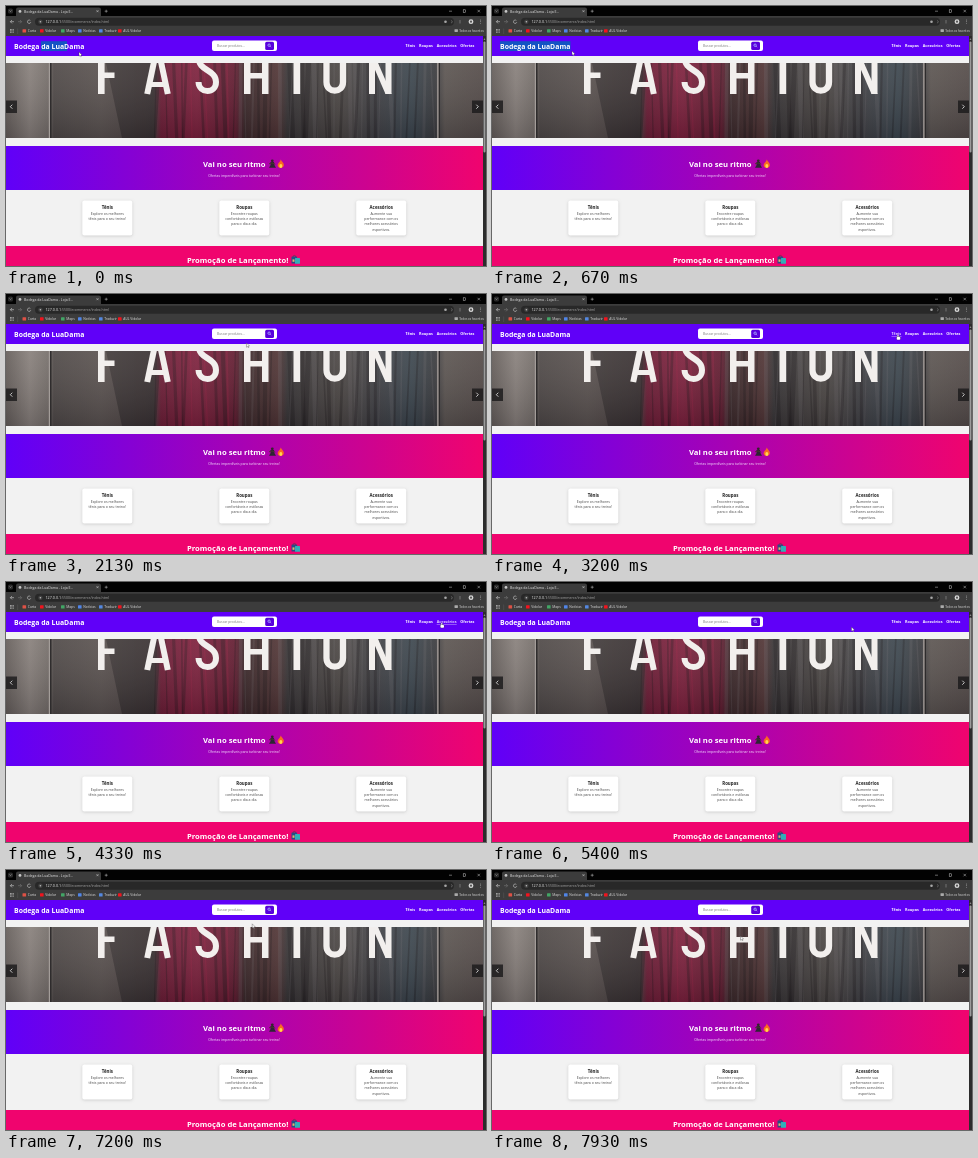
An HTML page with a canvas that plays this animation: 480 by 260 pixels, repeating every 8 s.

```html
<!DOCTYPE html>
<html lang="pt-BR">
<head>
<meta charset="utf-8">
<title>Bodega da LuaDama</title>
<style>
html, body { margin: 0; width: 100%; height: 100%; overflow: hidden; background: #000; }
canvas { display: block; width: 480px; height: 260px; }
</style>
</head>
<body>
<canvas id="stage" width="480" height="260"></canvas>
<script>
const LOOP = 8000, STEP = 1000 / 15;
const SANS = '"Open Sans", "Noto Sans", sans-serif';
const PURPLE = '#6000f8', PINK = '#f0046e';
const SHOP = 'Bodega da LuaDama';
const NAV = [['Tênis', 399.5, 10], ['Roupas', 413, 14], ['Acessórios', 430.7, 20], ['Ofertas', 454.3, 14]];

const stage = document.getElementById('stage').getContext('2d');
const page = document.createElement('canvas');
page.width = 480;
page.height = 260;
let g = page.getContext('2d');

function rect(x, y, w, h, fill) {
  g.fillStyle = fill;
  g.fillRect(x, y, w, h);
}

function round(x, y, w, h, r, fill) {
  g.fillStyle = fill;
  g.beginPath();
  g.roundRect(x, y, w, h, r);
  g.fill();
}

function dot(x, y, r, fill) {
  g.fillStyle = fill;
  g.beginPath();
  g.arc(x, y, r, 0, 7);
  g.fill();
}

function line(color, width, ...pts) {
  g.strokeStyle = color;
  g.lineWidth = width;
  g.beginPath();
  for (let i = 0; i < pts.length; i += 2) g.lineTo(pts[i], pts[i + 1]);
  g.stroke();
}

function shape(fill, ...pts) {
  g.fillStyle = fill;
  g.beginPath();
  for (let i = 0; i < pts.length; i += 2) g.lineTo(pts[i], pts[i + 1]);
  g.fill();
}

// Set large and scaled down, so small glyphs keep fractional spacing.
function text(str, x, y, size, color, weight = 400, align = 'left') {
  g.save();
  g.translate(x, y);
  g.scale(0.25, 0.25);
  g.font = `${weight} ${size * 4}px ${SANS}`;
  g.textAlign = align;
  g.fillStyle = color;
  g.fillText(str, 0, 0);
  g.restore();
}

function fade(x0, x1, stops) {
  const grad = g.createLinearGradient(x0, 0, x1, 0);
  stops.forEach(([at, color]) => grad.addColorStop(at, color));
  return grad;
}

function browser() {
  rect(0, 0, 480, 10, '#020202');
  round(10, 1.5, 85, 9, [2, 2, 0, 0], '#3c3c3c');
  dot(14, 5.4, 1.4, '#c8c8c8');
  text(SHOP + ' - Loja E…', 18, 6.7, 3.5, '#e6e6e6');
  line('#ddd', 0.5, 90.5, 4.2, 92.5, 6.2);
  line('#ddd', 0.5, 92.5, 4.2, 90.5, 6.2);
  line('#ccc', 0.5, 98.7, 5.2, 101.7, 5.2);
  line('#ccc', 0.5, 100.2, 3.7, 100.2, 6.7);
  round(2, 2.5, 5, 5, 1.5, '#2b2b2b');
  line('#ccc', 0.5, 3.5, 4.5, 4.5, 5.5, 5.5, 4.5);
  line('#ccc', 0.5, 443, 5.2, 446, 5.2);
  g.strokeRect(457.2, 3.8, 2.5, 2.5);
  line('#ccc', 0.5, 471.5, 3.8, 474, 6.3);
  line('#ccc', 0.5, 474, 3.8, 471.5, 6.3);

  rect(0, 10, 480, 20, '#3c3c3c');
  line('#d0d0d0', 0.6, 8, 15.7, 4.4, 15.7, 6, 14);
  line('#d0d0d0', 0.6, 4.4, 15.7, 6, 17.4);
  line('#777', 0.6, 12, 15.7, 15.6, 15.7, 14, 14);
  line('#777', 0.6, 15.6, 15.7, 14, 17.4);
  g.strokeStyle = '#d0d0d0';
  g.beginPath();
  g.arc(23.2, 15.7, 1.7, 0.3, 5.5);
  g.stroke();
  round(29, 11.8, 419, 8, 4, '#282828');
  dot(34.4, 15.8, 2.2, '#414141');
  dot(34.4, 15.8, 0.8, '#bbb');
  text('127.0.0.1', 39.5, 17.3, 3.7, '#f0f0f0');
  text(':5500/ecommerce/index.html', 55, 17.3, 3.5, '#a9a9a9');
  dot(439.5, 15.8, 1.3, '#a8a8a8');
  line('#999', 0.5, 445, 14.4, 446.5, 15.8, 445, 17.2);
  line('#aaa', 0.5, 454, 14, 454, 17.5);
  dot(465, 15.7, 2.4, '#d8d8d8');
  dot(465, 15.7, 1.1, '#555');
  for (let i = 0; i < 3; i++) dot(474.5, 14 + i * 1.6, 0.4, '#ddd');

  for (let i = 0; i < 9; i++) rect(4 + i % 3 * 1.4, 23 + (i / 3 | 0) * 1.4, 0.9, 0.9, '#bbb');
  line('#666', 0.4, 11.7, 22.5, 11.7, 28);
  const marks = [['Carta', 16.5, '#de5145'], ['Vidolar', 34, '#f0141e'], ['Maps', 55, '#42a565'],
    ['Notícias', 72, '#5085e8'], ['Traduzir', 93, '#5488e0'], ['AUL Vidolar', 112, '#f0141e']];
  marks.forEach(([name, x, color]) => {
    round(x, 23.2, 3.6, 3.4, 0.5, color);
    text(name, x + 5.3, 26.3, 3.3, '#dedede');
  });
  round(448.5, 23.2, 3.4, 2.8, 0.4, '#aaa');
  text('Todos os favoritos', 453.2, 26.3, 2.9, '#dedede');
}

function header() {
  rect(0, 30, 477, 20, PURPLE);
  round(206, 34.6, 65, 10.4, 2, '#fff');
  text('Buscar produtos...', 211, 41, 3.25, '#777');
  round(259.2, 35.7, 8.8, 8.4, 1.5, '#5800dc');
  g.strokeStyle = '#b3cfff';
  g.lineWidth = 0.7;
  g.beginPath();
  g.arc(263.1, 39.2, 1.2, 0, 7);
  g.stroke();
  line('#d5b7ff', 0.7, 264, 40.1, 265.1, 41.2);
}

function photo() {
  g.save();
  g.beginPath();
  g.rect(0, 57, 477, 75);
  g.clip();
  rect(0, 57, 477, 75, fade(0, 477, [
    [0, '#66605d'], [0.05, '#8b8480'], [0.09, '#77716d'], [0.1, '#4f4a49'], [0.2, '#5c5553'],
    [0.31, '#4c4243'], [0.325, '#701d38'], [0.4, '#81213f'], [0.48, '#641c32'], [0.5, '#3b292b'],
    [0.57, '#513536'], [0.59, '#383638'], [0.7, '#4d4947'], [0.78, '#414348'], [0.85, '#3c4851'],
    [0.9, '#3a3c40'], [0.92, '#5d5754'], [1, '#554d4b']]));

  let seed = 17;
  const rnd = () => (seed = seed * 16807 % 2147483647) / 2147483647;
  for (let x = 150; x < 425; x += 4 + rnd() * 6) {
    const w = 1 + rnd() * 4, lean = rnd() * 8 - 4;
    const red = x < 228;
    const tone = rnd() < 0.5 ? (red ? 'rgba(175,35,75,.27)' : 'rgba(125,120,125,.2)') : 'rgba(20,15,20,.3)';
    shape(tone, x, 57, x + w, 57, x + w + lean, 132, x + lean, 132);
  }
  shape('rgba(28,26,28,.4)', 100, 57, 155, 57, 150, 132, 116, 132);
  const shade = g.createLinearGradient(0, 57, 0, 132);
  shade.addColorStop(0, 'rgba(190,180,175,.12)');
  shade.addColorStop(1, 'rgba(15,10,14,.22)');
  rect(0, 57, 477, 75, shade);
  rect(42.8, 57, 1.3, 75, '#a39d99');
  rect(44.1, 57, 1.4, 75, '#292627');
  rect(431.3, 57, 1.4, 75, '#b2aaa5');
  rect(432.7, 57, 1.2, 75, '#2b292a');
  lettering();
  g.restore();

  for (const [x, dir] of [[0, -1], [466, 1]]) {
    rect(x, 94.5, 11, 12.5, 'rgba(28,26,28,.82)');
    const c = x + 5.3;
    line('#eee', 0.8, c - dir, 98.7, c + dir, 100.7, c - dir, 102.7);
  }
}

// Sign letters, cut off above the picture's top edge.
function lettering() {
  const ink = '#f2efed';
  g.lineJoin = 'miter';
  rect(92, 50, 6.6, 38, ink);
  rect(92, 66.5, 16.5, 5.5, ink);
  line(ink, 6, 141.2, 88, 150.5, 44);
  line(ink, 6, 161.8, 88, 152.5, 44);
  rect(144, 76, 15, 5, ink);
  g.lineWidth = 6;
  g.beginPath();
  g.moveTo(193, 52);
  g.bezierCurveTo(192, 65, 210, 63, 210, 76);
  g.bezierCurveTo(210, 88, 193, 88, 192.5, 76);
  g.stroke();
  rect(238, 50, 6.5, 38, ink);
  rect(256, 50, 6.5, 38, ink);
  rect(238, 67, 24, 5.5, ink);
  rect(287.5, 50, 6.7, 38, ink);
  g.lineWidth = 6.3;
  g.beginPath();
  g.moveTo(320.5, 50);
  g.lineTo(320.5, 76);
  g.bezierCurveTo(320.5, 87.5, 337, 87.5, 337, 76);
  g.lineTo(337, 50);
  g.stroke();
  rect(363, 50, 6, 38, ink);
  rect(379.5, 50, 6, 38, ink);
  shape(ink, 363, 50, 369, 50, 385.5, 88, 379.5, 88);
}

function flame(x, y) {
  g.fillStyle = '#f96a22';
  g.beginPath();
  g.moveTo(x, y - 4.5);
  g.bezierCurveTo(x + 1, y - 2, x + 3.5, y - 1, x + 3, y + 1.5);
  g.bezierCurveTo(x + 2.5, y + 4.8, x - 3, y + 4.8, x - 3.2, y + 1.2);
  g.bezierCurveTo(x - 3.2, y - 1, x - 0.5, y - 2, x, y - 4.5);
  g.fill();
  g.fillStyle = '#ffd650';
  g.beginPath();
  g.ellipse(x, y + 2, 1.5, 1.9, 0, 0, 7);
  g.fill();
}

function hero() {
  rect(0, 140, 477, 44, fade(0, 477, [[0, PURPLE], [1, PINK]]));
  text('Vai no seu ritmo', 197, 160.6, 7.7, '#fff', 700);
  dot(266.3, 154.8, 1.4, '#33242b');
  shape('#2c2532', 264.4, 156, 268, 156, 268.4, 159, 270, 161.8, 263, 161.8, 264.6, 159);
  line('#4d3530', 0.9, 263, 157.8, 266, 157, 269.3, 158.2);
  flame(274.8, 158);
  text('Ofertas imperdíveis para turbinar seu treino!', 238, 171, 3.45, '#f6e6ff', 400, 'center');
}

function card(x, title, lines) {
  g.save();
  g.shadowColor = 'rgba(0,0,0,.16)';
  g.shadowBlur = 3;
  g.shadowOffsetY = 0.7;
  round(x, 194.5, 50, 35, 2, '#fff');
  g.restore();
  text(title, x + 25, 203.4, 4.4, '#222', 700, 'center');
  lines.forEach((s, i) => text(s, x + 25, 209 + i * 5.2, 3.5, '#444', 400, 'center'));
}

function promo() {
  rect(0, 240, 477, 20, PINK);
  text('Promoção de Lançamento!', 181, 257, 7.65, '#fff', 700);
  round(285.5, 250.5, 5.6, 7, 0.5, '#294d86');
  round(289, 252, 5, 5.7, 0.5, '#33aeb8');
  rect(286.5, 253.4, 2, 2.4, '#e4b56a');
  g.strokeStyle = '#493b4d';
  g.lineWidth = 0.6;
  g.beginPath();
  g.arc(288.4, 250.8, 1.4, Math.PI, 0);
  g.stroke();
}

function drawPage() {
  rect(0, 0, 480, 260, '#f2f2f2');
  browser();
  header();
  photo();
  hero();
  card(76.3, 'Tênis', ['Explore os melhores', 'tênis para o seu treino!']);
  card(213.3, 'Roupas', ['Encontre roupas', 'confortáveis e estilosas', 'para o dia a dia.']);
  card(350.2, 'Acessórios', ['Aumente sua', 'performance com os', 'melhores acessórios', 'esportivos.']);
  promo();
  rect(477, 30, 3, 230, '#2c2c2c');
  shape('#a5a5a5', 477.6, 33.7, 478.5, 32.2, 479.4, 33.7);
  round(477.5, 35.5, 2, 111, 1, '#9b9b9b');
}

// Pointer path: time, x, y.
const PATH = [[0, 73, 46], [270, 79, 46], [700, 80, 45], [1000, 118, 46], [1330, 147, 46],
  [1700, 170, 47], [2050, 240, 49], [2550, 385, 46], [2800, 402, 41], [3200, 406, 41],
  [3450, 408, 41], [3750, 419, 41], [4050, 424, 41], [4330, 437.5, 41], [4580, 447, 41],
  [4800, 460, 41], [5000, 460, 41], [5400, 359.5, 45], [5850, 270, 42], [6150, 244, 42],
  [6900, 244, 42], [7350, 247, 58], [7700, 248.5, 66], [8000, 248.5, 66]];

function pointerAt(t) {
  const i = PATH.findIndex((p, n) => n > 0 && t <= p[0]);
  const [t0, x0, y0] = PATH[i - 1], [t1, x1, y1] = PATH[i];
  const k = (t - t0) / (t1 - t0), e = k * k * (3 - 2 * k);
  return [x0 + (x1 - x0) * e, y0 + (y1 - y0) * e];
}

function arrow(x, y) {
  const pts = [0, 0, 0, 4.2, 1, 3.4, 1.7, 4.7, 2.4, 4.3, 1.8, 3.1, 3, 3];
  const at = pts.map((v, i) => v + (i % 2 ? y : x));
  shape('#fff', ...at);
  line('#333', 0.35, ...at, x, y);
}

function hand(x, y) {
  const edge = '#303030';
  g.strokeStyle = edge;
  g.lineWidth = 0.6;
  g.fillStyle = '#fff';
  g.beginPath();
  g.roundRect(x - 0.6, y, 1.2, 4, 0.6);
  g.stroke();
  g.fill();
  g.beginPath();
  g.roundRect(x - 1.3, y + 2, 3.6, 2.7, 0.8);
  g.stroke();
  g.fill();
}

function beam(x, y) {
  line('#222', 0.6, x, y - 2.2, x, y + 2.2);
  line('#222', 0.5, x - 0.8, y - 2.2, x + 0.8, y - 2.2);
  line('#222', 0.5, x - 0.8, y + 2.2, x + 0.8, y + 2.2);
}

function draw(t) {
  const [x, y] = pointerAt(t);
  g.drawImage(page, 0, 0);

  if (t < 2050) {
    const grow = Math.min(1, t / 330);
    const left = 35 - 27 * grow, right = 61 + 17.5 * grow;
    rect(left, 35.2, right - left, 9.8, '#1453c4');
  }
  text(SHOP, 8, 42.6, 6.9, '#fff', 700);

  const onRow = y > 36 && y < 43;
  const link = NAV.find(([, nx, w]) => onRow && x >= nx && x <= nx + w);
  NAV.forEach(item => {
    const [name, nx, w] = item;
    text(name, nx, 41.3, 3.75, item === link ? '#e4d4ff' : '#fff', 700);
    if (item === link) rect(nx, 42, w, 0.4, '#e4d4ff');
  });

  if (t > 6250 && t < 7600 && (t - 6250) % 1060 < 530) rect(210.8, 37.5, 0.6, 4.5, '#222');

  const inSearch = x > 206 && x < 258 && y > 35 && y < 45;
  if (link) hand(x, y);
  else if (inSearch) beam(x, y);
  else arrow(x, y);
}

drawPage();
g = stage;
const start = performance.now();
function tick() {
  const t = (performance.now() - start) % LOOP;
  draw(Math.floor(t / STEP + 0.01) * STEP);
  requestAnimationFrame(tick);
}
tick();
</script>
</body>
</html>
```
